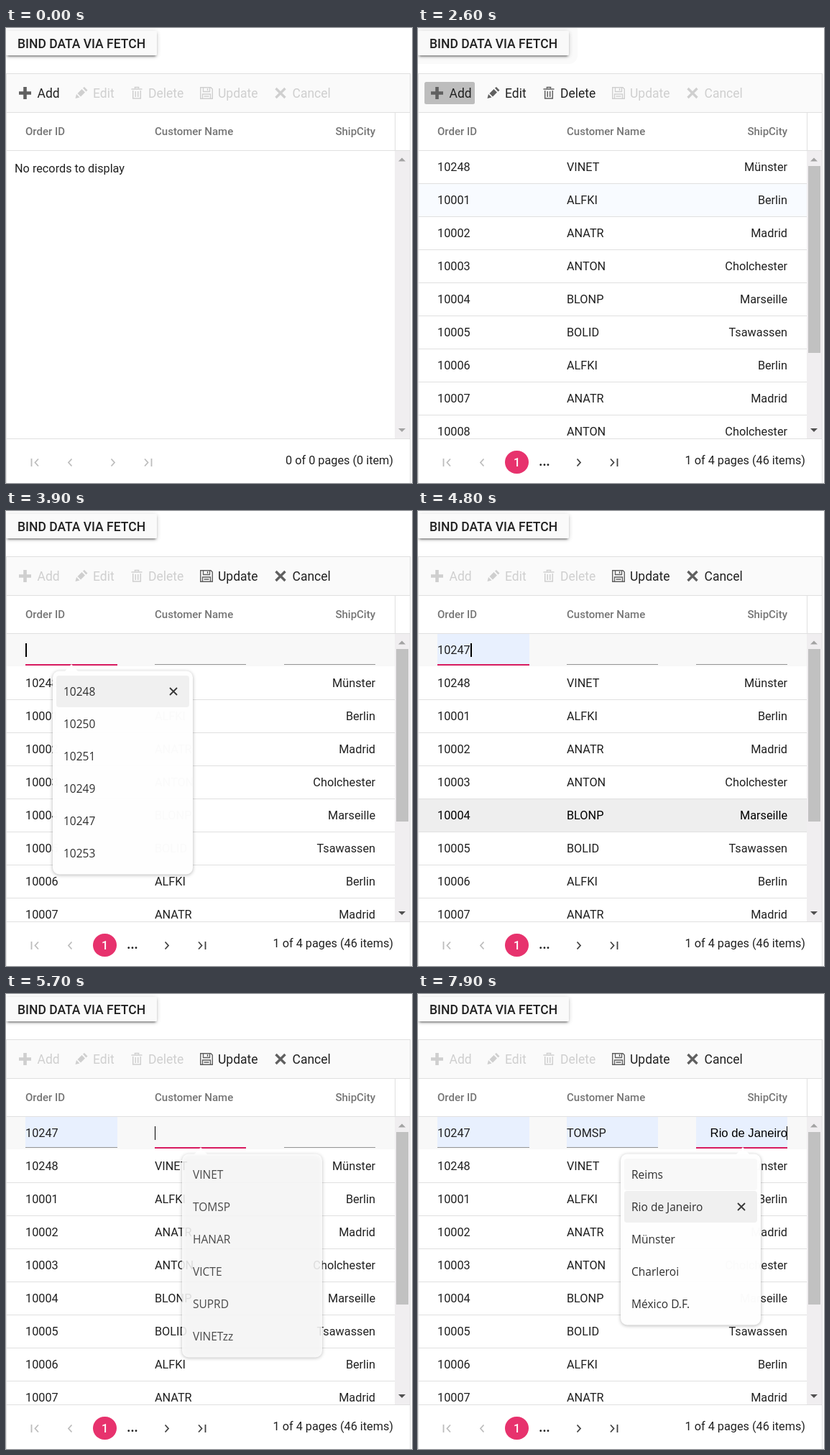
These frames come from a looping animation (565x633 px, 8 s). An HTML page with a canvas:

```html
<!DOCTYPE html>
<html lang="en">
<head>
<meta charset="utf-8">
<title>Data grid</title>
<style>
html, body { margin: 0; width: 100%; height: 100%; overflow: hidden; background: #fff; }
canvas { display: block; }
</style>
</head>
<body>
<canvas id="stage" width="565" height="633"></canvas>
<script>
const ctx = document.getElementById('stage').getContext('2d');
const LOOP = 8000;
const INK = '#212121', OFF = '#cfcfcf', ICON = '#606060', LINE = '#e0e0e0', PINK = '#d81b60';
const font = (size, weight = 400, family = 'Roboto') => `${weight} ${size}px ${family}, sans-serif`;
const CELL = font(16.25), HEAD = font(15, 500), TOOL = font(17.5), BUTTON = font(17.5, 500);
const POPUP = font(15.5, 400, '"Open Sans"'), PREVIEW = font(16.67, 400, '"Liberation Sans"');

const people = [['ALFKI', 'Berlin'], ['ANATR', 'Madrid'], ['ANTON', 'Cholchester'],
  ['BLONP', 'Marseille'], ['BOLID', 'Tsawassen']];
const rows = [['10248', 'VINET', 'Münster']];
for (let i = 0; i < 8; i++) rows.push([String(10001 + i), ...people[i % 5]]);

const inputs = [[27, 128], [207, 127], [387, 127]];
const popups = [
  { x: 65, notch: 91, items: ['10248', '10250', '10251', '10249', '10247', '10253'] },
  { x: 245, notch: 271, items: ['VINET', 'TOMSP', 'HANAR', 'VICTE', 'SUPRD', 'VINETzz'] },
  { x: 282, notch: 452, items: ['Reims', 'Rio de Janeiro', 'Münster', 'Charleroi', 'México D.F.'] }
];

// Each entry changes part of the state from its time on.
const timeline = [
  [0, { button: 'rest', loaded: false, editing: false, add: false, hover: -1, tint: -1,
        focus: -1, caret: false, values: ['', '', ''], preview: '', alpha: 0, item: -1, faint: -1 }],
  [700, { button: 'hover' }],
  [800, { button: 'pressed' }],
  [1000, { loaded: true }],
  [1600, { hover: 0 }],
  [1700, { hover: 1 }],
  [2000, { hover: -1, tint: 1 }],
  [2200, { add: true }],
  [2600, { button: 'focus' }],
  [2800, { button: 'rest', editing: true, add: false, tint: -1, focus: 0, caret: true }],
  [3100, { hover: 0 }],
  [3200, { caret: false }],
  [3500, { hover: -1, caret: true, alpha: 0.3 }],
  [3600, { alpha: 0.8 }],
  [3700, { alpha: 0.98 }],
  [3900, { item: 0 }],
  [4000, { item: 1, caret: false, preview: '10250' }],
  [4100, { item: 3, preview: '10249' }],
  [4200, { item: 4, preview: '10247' }],
  [4600, { alpha: 0.85 }],
  [4700, { alpha: 0.4, values: ['10247', '', ''], preview: '', caret: true }],
  [4800, { alpha: 0, item: -1, hover: 4 }],
  [4900, { hover: 3 }],
  [5000, { hover: 1 }],
  [5100, { hover: 0 }],
  [5200, { caret: false }],
  [5500, { hover: -1, focus: 1, caret: true }],
  [5600, { alpha: 0.4 }],
  [5700, { alpha: 0.85 }],
  [5800, { alpha: 0.98 }],
  [6000, { caret: false }],
  [6500, { item: 0, preview: 'VINET' }],
  [6600, { item: 1, preview: 'TOMSP', faint: 0 }],
  [7000, { alpha: 0.82 }],
  [7100, { alpha: 0.35, values: ['10247', 'TOMSP', ''], preview: '' }],
  [7200, { alpha: 0, item: -1, faint: -1, hover: 1 }],
  [7300, { hover: -1, focus: 2 }],
  [7500, { alpha: 0.5, caret: true }],
  [7600, { alpha: 0.98 }],
  [7700, { item: 0 }],
  [7800, { item: 1, faint: 0, preview: 'Rio de Janeiro' }]
];

const stateAt = t => Object.assign({}, ...timeline.filter(([at]) => at <= t).map(([, patch]) => patch));

function box(x, y, w, h, color) {
  ctx.fillStyle = color;
  ctx.fillRect(x, y, w, h);
}

function round(x, y, w, h, r, color) {
  ctx.fillStyle = color;
  ctx.beginPath();
  ctx.roundRect(x, y, w, h, r);
  ctx.fill();
}

function text(str, x, y, style, color = INK, align = 'left') {
  ctx.font = style;
  ctx.fillStyle = color;
  ctx.textAlign = align;
  ctx.fillText(str, x, y);
}

function stroke(path, color, width = 1.8) {
  ctx.strokeStyle = color;
  ctx.lineWidth = width;
  ctx.stroke(new Path2D(path));
}

function fill(path, color) {
  ctx.fillStyle = color;
  ctx.fill(new Path2D(path));
}

function shadow(x, y, w, h, r, dy, blur, alpha, color = '#fff') {
  ctx.save();
  ctx.shadowColor = `rgba(0,0,0,${alpha})`;
  ctx.shadowOffsetY = dy;
  ctx.shadowBlur = blur;
  round(x, y, w, h, r, color);
  ctx.restore();
}

function drawButton(mode) {
  const color = { rest: '#fafafa', hover: '#e4e4e4', pressed: '#d1d1d1', focus: '#f9f9f9' }[mode];
  if (mode === 'pressed' || mode === 'focus') round(-12, -8, 234, 58, 12, '#fafafa');
  shadow(2.5, 6, 205.5, 30, 2.5, 4, 1.5, 0.2);
  shadow(0, 4, 210, 34, 2.5, 2.5, 2.5, 0.14);
  shadow(0, 4, 210, 34, 2.5, 1.25, 6, 0.2);
  round(0, 4, 210, 34, 2.5, color);
  text('BIND DATA VIA FETCH', 16, 28, BUTTON);
}

const icons = {
  add: c => stroke('M18 90.5H35M26.5 82V99', c, 4.6),
  edit: c => fill('M96.5 98l1.5-6 4.5 4.5zM99.5 91l6-6 4.5 4.5-6 6zM107 83.5l2-1.5 4.5 4.5-2 2z', c),
  trash: c => {
    stroke('M174.5 85H189.5M179.5 84V82.5H184.5V84', c, 1.6);
    stroke('M176.7 87V98H187.3V87M180.3 88V96M183.7 88V96', c, 1.5);
  },
  disk: c => {
    stroke('M270.7 82.7H285L287.3 85V98.3H270.7Z', c, 1.4);
    stroke('M274.5 83V88.5H283.5V83M280.5 84V87M273.5 98V92H284.5V98M275.5 95H282.5', c, 1.3);
  },
  cross: c => stroke('M375.5 84L388.5 97M388.5 84L375.5 97', c, 3.4)
};

function drawToolbar(s) {
  box(1, 64, 561, 53, '#fafafa');
  if (s.add) round(9, 75, 70, 31, 2.5, '#bdbdbd');
  const tools = [
    ['Add', 43.5, 'add', !s.editing],
    ['Edit', 121, 'edit', s.loaded && !s.editing],
    ['Delete', 198, 'trash', s.loaded && !s.editing],
    ['Update', 295, 'disk', s.editing],
    ['Cancel', 398.5, 'cross', s.editing]
  ];
  for (const [label, x, icon, on] of tools) {
    icons[icon](on ? ICON : OFF);
    text(label, x, 97, TOOL, on ? INK : OFF);
  }
}

function drawHeader() {
  const gray = '#757575';
  box(0, 117, 563, 1, LINE);
  text('Order ID', 27, 149, HEAD, gray);
  text('Customer Name', 207, 149, HEAD, gray);
  text('ShipCity', 514, 149, HEAD, gray, 'right');
  box(541, 118, 1, 53, LINE);
  box(0, 170, 563, 1, LINE);
}

function drawRows(s) {
  if (!s.loaded) {
    text('No records to display', 12, 201, CELL);
    return;
  }
  rows.forEach((row, i) => {
    const y = 171 + 46 * (i + (s.editing ? 1 : 0));
    if (i === s.hover) box(1, y, 540, 45, '#eeeeee');
    else if (i === s.tint) box(1, y, 540, 45, '#f8fbff');
    const color = i === s.hover ? '#000' : INK;
    text(row[0], 27, y + 28, CELL, color);
    text(row[1], 207, y + 28, CELL, color);
    text(row[2], 514, y + 28, CELL, color, 'right');
    box(1, y + 45, 540, 1, LINE);
  });
}

function drawForm(s) {
  box(1, 171, 540, 45, '#f8f8f8');
  inputs.forEach(([x, w], i) => {
    const focused = i === s.focus;
    const preview = focused ? s.preview : '';
    const value = preview || s.values[i];
    const right = i === 2;
    if (value) box(x, 171, w, 43, '#e8f0fe');
    if (focused) box(x, 213, w, 2, PINK);
    else box(x, 213, w, 1, '#949494');
    const style = preview ? PREVIEW : CELL;
    text(value, right ? x + w : x, 199, style, preview ? '#000' : INK, right ? 'right' : 'left');
    if (focused && s.caret) {
      const caretX = right ? x + w - 1 : x + (value ? Math.round(ctx.measureText(value).width) : 0);
      box(caretX, 184, i ? 1 : 2, 19, '#000');
    }
  });
}

function drawScrollbar(s) {
  box(541, 171, 21, 400, '#f0eef0');
  if (s.loaded) box(543, 192, 17, s.editing ? 240 : 260, '#c1c1c1');
  fill('M546 185.5L551 180.5L556 185.5Z', '#a3a3a3');
  fill('M546 557L551 562L556 557Z', s.loaded ? '#505050' : '#a3a3a3');
}

function drawPager(s) {
  box(0, 571, 563, 62, '#fff');
  box(0, 571, 563, 1, LINE);
  const off = '#bdbdbd', on = s.loaded ? '#424242' : off, shift = s.loaded ? 75 : 0;
  stroke('M35.5 599V610M45 599.5L40.5 604.5L45 609.5', off);
  stroke('M91.5 599.5L87 604.5L91.5 609.5', off);
  stroke(`M${146.5 + shift} 599.5l4.5 5l-4.5 5`, on);
  stroke(`M${193 + shift} 599.5l4.5 5l-4.5 5M${202.5 + shift} 599v11`, on);
  if (s.loaded) {
    round(121, 588, 33, 32, 16, '#e7326d');
    text('1', 137.5, 610, font(16.25, 500), '#fff', 'center');
    text('...', 176, 609, font(17.5, 700), INK, 'center');
  }
  text(s.loaded ? '1 of 4 pages (46 items)' : '0 of 0 pages (0 item)', 539, 607, CELL, INK, 'right');
}

function drawPopup(s) {
  const { x, notch, items } = popups[s.focus];
  const h = items.length * 45 + 13;
  ctx.save();
  ctx.globalAlpha = s.alpha;
  shadow(x, 222.5, 195, h, 9, 1, 5, 0.3);
  fill(`M${notch - 9} 223L${notch} 213L${notch + 9} 223Z`, '#fff');
  items.forEach((item, i) => {
    const y = 229 + 45 * i;
    if (i === s.item) {
      round(x + 5, y, 185, 44, 4, '#f0f0f0');
      stroke(`M${x + 163} ${y + 17}l10 10m0 -10l-10 10`, '#333');
    } else if (i === s.faint) {
      round(x + 5, y, 185, 44, 4, '#f8f8f8');
    }
    text(item, x + 15, y + 28, POPUP, '#2b2b2b');
  });
  ctx.restore();
}

function draw(s) {
  box(0, 0, 565, 633, '#fff');
  drawButton(s.button);
  drawToolbar(s);
  drawHeader();
  drawRows(s);
  if (s.editing) drawForm(s);
  drawScrollbar(s);
  drawPager(s);
  box(0, 63, 563, 1, LINE);
  box(0, 63, 1, 570, LINE);
  box(562, 63, 1, 570, LINE);
  if (s.alpha) drawPopup(s);
}

function frame() {
  draw(stateAt(performance.now() % LOOP));
  requestAnimationFrame(frame);
}
frame();
</script>
</body>
</html>
```
